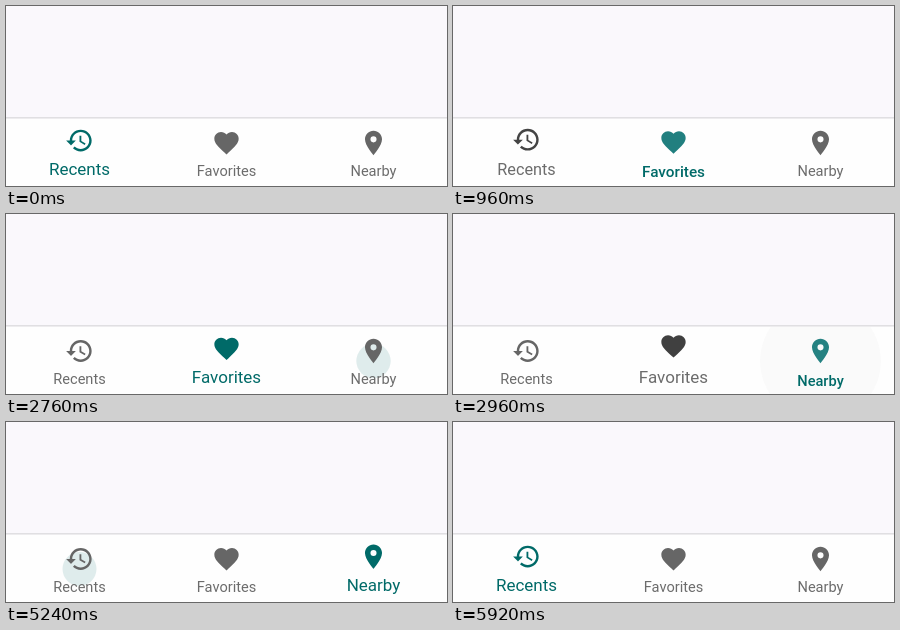
Recreate the animation shown at these times as an HTML page with a canvas. Size 441x180 px, loop 7000 ms.

```html
<!DOCTYPE html>
<html lang="en">
<head>
<meta charset="utf-8">
<title>Bottom navigation</title>
<style>
  html, body { margin: 0; width: 100%; height: 100%; overflow: hidden; background: #faf8fc; }
  canvas { display: block; width: 441px; height: 180px; }
</style>
</head>
<body>
<canvas id="stage"></canvas>
<script>
const WIDTH = 441, HEIGHT = 180, LOOP = 7000, STEP = 40;
const BAR_TOP = 113, ICON_Y = 137, LIFT = 2.4, ICON_SCALE = 29.2 / 24;
const SMALL = 14.6, LARGE = 17;
const SMALL_BASE = 170.3, LARGE_BASE = 168.8, ENTER_BASE = 172.3;
const MOVE_MS = 145, TINT_MS = 360;
const TEAL = [0, 106, 104], GRAY = [102, 102, 102], DARK = [64, 64, 64];
const PALE_TEAL = [37, 130, 130], LABEL_GRAY = [108, 108, 108], INK = [73, 69, 79];

const tabs = [
  { label: 'Recents', x: 73.5, icon: new Path2D('M13 3c-4.97 0-9 4.03-9 9H1l3.89 3.89.07.14L9 12H6c0-3.87 3.13-7 7-7s7 3.13 7 7-3.13 7-7 7c-1.93 0-3.68-.79-4.94-2.06l-1.42 1.42C8.27 19.99 10.51 21 13 21c4.97 0 9-4.03 9-9s-4.03-9-9-9zm-1 5v5l4.28 2.54.72-1.21-3.5-2.08V8H12z') },
  { label: 'Favorites', x: 220.5, icon: new Path2D('M12 21.35l-1.45-1.32C5.4 15.36 2 12.28 2 8.5 2 5.42 4.42 3 7.5 3c1.74 0 3.41.81 4.5 2.09C13.09 3.81 14.76 3 16.5 3 19.58 3 22 5.42 22 8.5c0 3.78-3.4 6.86-8.55 11.54z') },
  { label: 'Nearby', x: 367.5, icon: new Path2D('M12 2C8.13 2 5 5.13 5 9c0 5.25 7 13 7 13s7-7.75 7-13c0-3.87-3.13-7-7-7zm0 9.5a2.5 2.5 0 0 1 0-5 2.5 2.5 0 0 1 0 5z') }
];

const taps = [
  { from: 0, to: 1, press: 600, select: 920 },
  { from: 1, to: 2, press: 2750, select: 2960 },
  { from: 2, to: 0, press: 5240, select: 5560 }
];

const canvas = document.getElementById('stage');
const ctx = canvas.getContext('2d');
const ratio = window.devicePixelRatio || 1;
canvas.width = Math.round(WIDTH * ratio);
canvas.height = Math.round(HEIGHT * ratio);

const clamp = v => Math.max(0, Math.min(1, v));
const mix = (a, b, p) => a + (b - a) * p;
const mixColor = (a, b, p) => a.map((v, i) => mix(v, b[i], p));
const css = (c, alpha = 1) => `rgba(${c.map(Math.round).join(',')},${alpha})`;

// cubic-bezier(.4, 0, .2, 1)
function ease(x) {
  if (x <= 0 || x >= 1) return clamp(x);
  let lo = 0, hi = 1;
  for (let i = 0; i < 24; i++) {
    const s = (lo + hi) / 2, r = 1 - s;
    if (1.2 * r * r * s + 0.6 * r * s * s + s ** 3 < x) lo = s; else hi = s;
  }
  return 3 * (1 - lo) * lo * lo + lo ** 3;
}

function drawRipple(tap, t) {
  const age = t - tap.press;
  if (age < 0 || age >= 235) return;
  const alpha = 0.12 * clamp((235 - age) / 160);
  ctx.save();
  ctx.beginPath();
  ctx.rect(0, BAR_TOP, WIDTH, HEIGHT - BAR_TOP);
  ctx.clip();
  ctx.beginPath();
  ctx.arc(tabs[tap.to].x, 147, mix(17, 60.5, ease(age / 225)), 0, 2 * Math.PI);
  ctx.fillStyle = css(t < tap.select ? TEAL : INK, alpha);
  ctx.fill();
  ctx.restore();
}

function tabPose(index, t) {
  const tap = taps.filter(item => item.select <= t).pop();
  const selected = tap ? tap.to : 0;
  const age = tap ? t - tap.select : LOOP;
  const move = ease(age / MOVE_MS), tint = clamp(age / TINT_MS);
  if (index === selected) {
    return {
      iconY: ICON_Y - LIFT * move,
      iconColor: mixColor(PALE_TEAL, TEAL, tint),
      size: mix(SMALL, LARGE, move),
      base: mix(ENTER_BASE, LARGE_BASE, move),
      labelColor: TEAL,
      weight: move < 1 ? 500 : 400
    };
  }
  const leaving = tap && index === tap.from;
  const done = leaving ? move : 1;
  return {
    iconY: mix(ICON_Y - 2 * LIFT, ICON_Y, done),
    iconColor: mixColor(DARK, GRAY, leaving ? tint : 1),
    size: mix(LARGE, SMALL, done),
    base: mix(LARGE_BASE, SMALL_BASE, done),
    labelColor: LABEL_GRAY,
    weight: 400
  };
}

function drawTab(tab, pose) {
  ctx.save();
  ctx.translate(tab.x, pose.iconY);
  ctx.scale(ICON_SCALE, ICON_SCALE);
  ctx.translate(-12, -12);
  ctx.fillStyle = css(pose.iconColor);
  ctx.fill(tab.icon, 'evenodd');
  ctx.restore();

  ctx.font = `${pose.weight} ${pose.size}px Roboto, sans-serif`;
  ctx.textAlign = 'center';
  ctx.fillStyle = css(pose.labelColor);
  ctx.fillText(tab.label, tab.x, pose.base);
}

function draw(now) {
  const t = Math.floor((now % LOOP) / STEP) * STEP;
  ctx.setTransform(ratio, 0, 0, ratio, 0, 0);
  ctx.fillStyle = '#faf8fc';
  ctx.fillRect(0, 0, WIDTH, HEIGHT);
  ctx.fillStyle = '#e0dfe2';
  ctx.fillRect(0, 111, WIDTH, 2);
  ctx.fillStyle = '#fefefe';
  ctx.fillRect(0, 112.6, WIDTH, HEIGHT);
  taps.forEach(tap => drawRipple(tap, t));
  tabs.forEach((tab, i) => drawTab(tab, tabPose(i, t)));
}

const start = performance.now();
function tick() {
  draw(performance.now() - start);
  requestAnimationFrame(tick);
}
tick();
</script>
</body>
</html>
```
